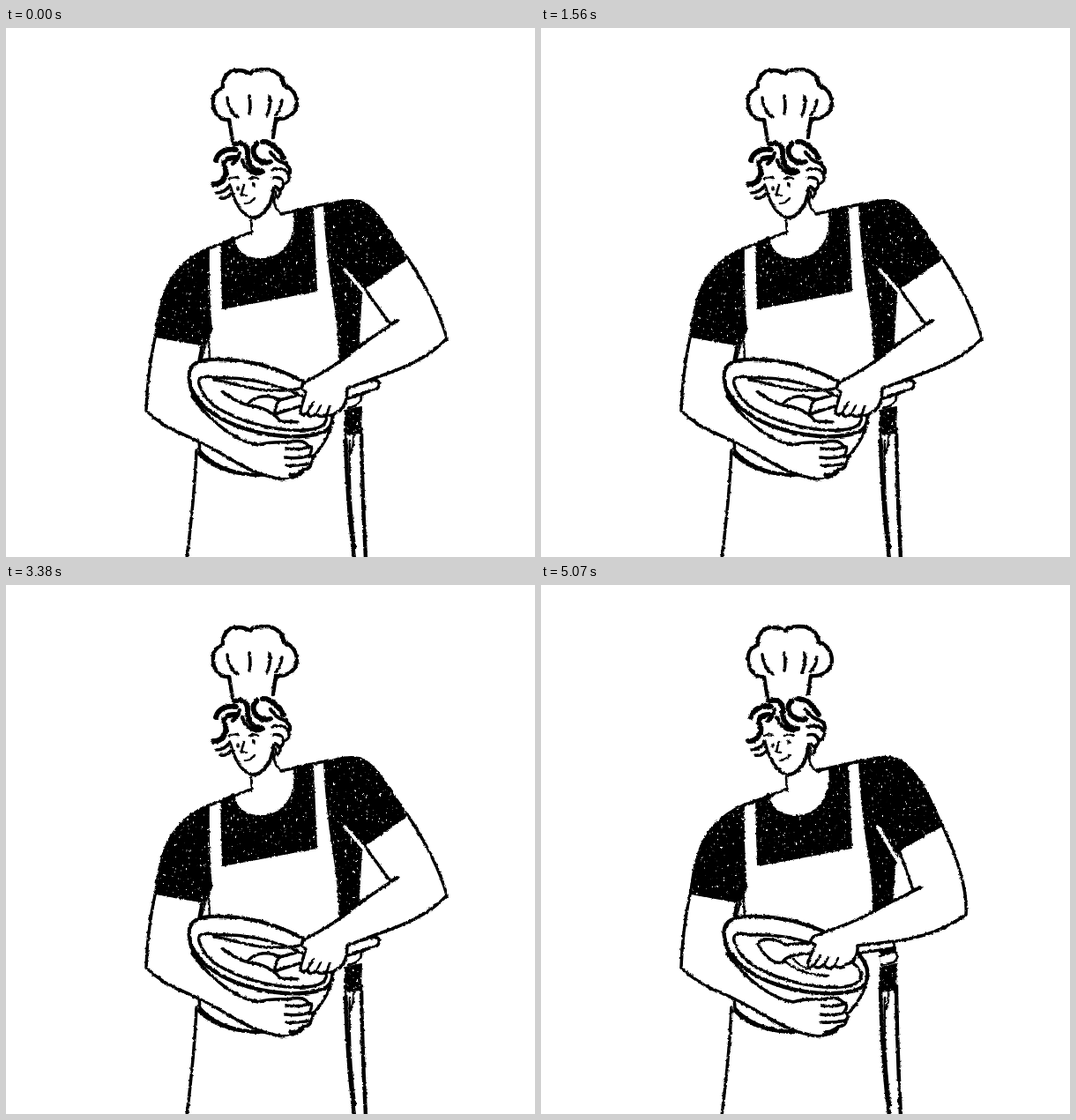
These frames come from a looping animation (600x600 px, 5200 ms). An HTML page:

```html
<!DOCTYPE html>
<html lang="en">
<head>
<meta charset="utf-8">
<title>Chef stirring a bowl</title>
<style>
  html, body { margin: 0; width: 100%; height: 100%; overflow: hidden; background: #fff; }
  svg { display: block; width: 100vw; height: 100vh; }
  path { fill: none; stroke: #000; stroke-width: 3.5; stroke-linecap: round; stroke-linejoin: round; }
  .ink path { fill: #000; stroke-width: 2; }
  .skin { fill: #fff; }
  .gap { stroke: #fff; stroke-width: 4; }
  .thin { stroke-width: 2.6; }
  .bold { stroke-width: 4.4; }
  .lock { stroke-width: 6; }
</style>
</head>
<body>
<svg id="stage" viewBox="0 0 600 600"></svg>
<script>
const line = (d, cls = '') => `<path class="${cls}" d="${d}"/>`;

// Rough chalk edges, and small flecks of paper inside solid areas.
const filters = seed => `
  <filter id="rough${seed}" filterUnits="userSpaceOnUse" x="0" y="0" width="600" height="600" color-interpolation-filters="sRGB">
    <feTurbulence type="fractalNoise" baseFrequency=".28" numOctaves="2" seed="${seed}" result="n"/>
    <feDisplacementMap in="SourceGraphic" in2="n" scale="3.2" xChannelSelector="R" yChannelSelector="G"/>
  </filter>
  <filter id="fleck${seed}" filterUnits="userSpaceOnUse" x="0" y="0" width="600" height="600" color-interpolation-filters="sRGB">
    <feTurbulence type="fractalNoise" baseFrequency=".45 .25" numOctaves="2" seed="${seed + 20}"/>
    <feColorMatrix values="0 0 0 0 0  0 0 0 0 0  0 0 0 0 0  0 0 0 12 -8.6" result="holes"/>
    <feComposite in="SourceGraphic" in2="holes" operator="out"/>
  </filter>`;

const hat =
  line('M257 128L253 104C244 105 236 98 235 86C234 76 239 70 246 68C245 56 252 48 263 48C269 48 274 50 277 52C282 46 301 45 307 51C312 54 315 59 315 65C324 67 330 76 330 86C329 97 319 104 306 103L303 124', 'skin bold') +
  line('M251 79C252 89 256 97 263 101M276 77Q278 88 276 97M299 78Q301 89 296 99M313 82Q312 92 306 98');

const head =
  line('M254 178C257 190 262 203 270 210Q276 216 281 215') +
  line('M281 215Q288 215 295 206Q302 198 303 184', 'bold') +
  line('M253 171Q258 168 263 170M276 171Q281 168 286 171M270 178Q268 184 267 189L272 190M271 199Q279 198 282 193', 'thin') +
  line('M263 181v2M281 177v2') +
  line('M304 194Q304 206 313 211M278 218L279 234M303 181Q309 187 304 195', 'thin');

const hair =
  line('M238 150C241 140 251 136 261 138', 'lock') +
  line('M260 147C249 147 245 152 249 160C251 169 244 178 235 177', 'lock') +
  line('M239 187Q248 187 253 179M243 193Q250 194 255 189') +
  line('M259 132C269 128 275 134 274 144C274 155 281 163 291 163', 'lock') +
  line('M265 142Q263 151 257 154M268 150C270 158 278 166 287 165', 'bold') +
  line('M285 131C277 137 281 147 287 150Q293 154 300 152', 'lock') +
  line('M291 129C303 129 309 139 315 147', 'lock') +
  line('M300 141Q305 150 315 153Q323 156 322 164', 'bold') +
  line('M302 161Q313 158 319 163Q324 172 317 176M303 170Q311 168 314 174Q317 181 309 184M306 180Q315 186 308 192');

const shirt =
  line('M169 350C172 322 178 296 190 280C200 266 216 255 230 249Q229 298 233 343L226 360Z') +
  line('M244 245L259 237C258 254 274 263 292 262C316 260 331 238 327 209L348 205L352 298Q298 308 246 318Z');

const body =
  line('M279 231Q255 241 230 250M312 211Q342 204 366 199') +
  line('M226 360L221 378M229 343L231 375', 'thin') +
  line('M216 479Q214 530 205 602') +
  line('M385 455Q386 530 395 602M403 455Q404 530 408 602', 'bold') +
  line('M394 460Q395 473 391 482M390 468Q388 530 396 590', 'thin');

const bowl =
  line('M215 425L220 480Q242 506 291 507L341 494Q361 475 369 453', 'skin') +
  line('M219 483Q242 506 287 507', 'bold');

const leftArm =
  line('M169 351Q160 395 159 434Q178 453 208 464C245 480 269 502 300 509Q314 514 323 510Q336 508 337 501Q347 500 346 493Q351 488 344 484Q350 476 342 473Q337 466 320 470Q300 469 286 473C265 470 235 451 211 418L222 362', 'skin') +
  line('M344 475Q333 479 318 477M345 485Q331 489 317 487M345 494Q331 497 318 496M337 501Q331 506 322 507');

// The rim lies over the arm that holds the bowl.
const rim =
  line('M208 399C205 380 220 375 243 376C287 376 332 394 355 414C377 433 374 455 355 460C323 468 278 461 244 443C225 432 210 418 208 399Z', 'skin bold') +
  line('M219 404C217 394 227 394 239 397C276 395 329 409 353 428C370 441 364 452 348 455C312 460 268 448 240 431Q224 420 219 404Z') +
  line('M209 406Q211 415 218 420', 'bold');

const block = 'M385 434L403 430L402 459L385 461Z';

const middle = {
  side: 'M361 202C375 195 394 193 404 197C421 206 431 225 455 260L406 295L403 302L399 371L379 378Q377 335 371 300Q363 248 361 202Z',
  detail:
    line('M235 399C262 402 286 417 333 409M246 413Q263 425 275 428Q300 431 311 446L331 447') +
    line('M274 427C283 415 302 416 310 422L333 416M310 422Q304 431 305 438L333 429'),
  arm:
    line('M384 408L418 399Q427 401 421 409L385 421', 'skin') +
    line('M406 295L455 260C474 289 492 322 500 352C479 375 450 386 421 396L387 409C387 424 382 434 375 435Q370 442 364 438Q357 443 352 438Q343 444 342 436Q334 442 334 433L340 413Q332 409 338 402L350 396Q381 379 399 362L445 331L436 336Z', 'skin') +
    line('M384 274L406 299', 'gap') +
    line('M342 436L349 424M352 438L357 428M364 438L367 429', 'thin') +
    line('M403 417Q404 428 388 431', 'thin')
};

const outward = {
  side: 'M361 202C375 195 394 193 404 197C421 206 434 222 453 246L408 288L404 303L399 371L379 378Q377 335 371 300Q363 248 361 202Z',
  detail:
    line('M235 399C262 402 296 418 354 420M250 416Q275 424 292 433Q312 436 326 449') +
    line('M292 432C300 420 319 421 328 427L360 417M328 427Q322 436 323 442L361 430'),
  arm:
    line('M410 405L444 394Q452 396 447 404L411 417', 'skin') +
    line('M408 288L453 246C478 268 507 298 522 327C502 352 470 370 440 388L413 405C413 420 408 430 401 432Q396 440 390 436Q383 441 378 436Q369 442 368 434Q360 440 360 431L366 411Q358 407 364 400L376 394Q400 376 415 360L458 318L448 324Z', 'skin') +
    line('M385 273L408 293', 'gap') +
    line('M368 434L375 422M378 436L383 426M390 436L393 427', 'thin')
};

const inward = {
  side: 'M361 202C376 194 393 193 404 197C426 207 441 239 455 272L406 300L401 320L398 362L377 369Q377 330 371 300Q363 248 361 202Z',
  extra: 'M385 415L402 411L401 425L386 430Z',
  detail:
    line('M305 406L277 408C266 400 250 400 246 407C253 421 265 431 274 428Q278 419 304 418', 'skin') +
    line('M277 427Q297 443 326 443M286 424Q294 433 305 436', 'thin'),
  arm:
    line('M354 408L394 403Q403 405 399 412L356 418', 'skin') +
    line('M406 300L455 272C473 311 484 345 482 374C458 391 432 400 402 404L359 409C360 421 353 430 346 430Q341 437 333 432Q326 438 321 431Q312 437 310 431Q301 437 303 427L311 408Q302 405 309 399L321 394Q363 380 390 363L431 343L422 346Z', 'skin') +
    line('M382 274L412 326', 'gap') +
    line('M310 431L317 420M321 431L326 422M333 432L337 423', 'thin') +
    line('M384 421L401 416Q408 421 400 428L386 431', 'skin thin')
};

const draw = ({ side, extra = '', detail, arm }, i) => {
  const seed = 3 + i * 4;
  return `${filters(seed)}<g class="pose" filter="url(#rough${seed})">
    ${body}<g class="ink" filter="url(#fleck${seed})">${shirt}${line(side)}${line(block)}${line(extra)}</g>
    ${hat}${head}${hair}${bowl}${leftArm}${rim}${detail}${arm}</g>`;
};

const stage = document.getElementById('stage');
stage.innerHTML = [middle, outward, inward].map(draw).join('');
const layers = stage.querySelectorAll('.pose');
const swing = [0, 1, 0, 2];

function tick() {
  const shown = swing[Math.floor(performance.now() % 5200 / 130) % swing.length];
  layers.forEach((layer, i) => layer.style.visibility = i === shown ? 'visible' : 'hidden');
  requestAnimationFrame(tick);
}
tick();
</script>
</body>
</html>
```
